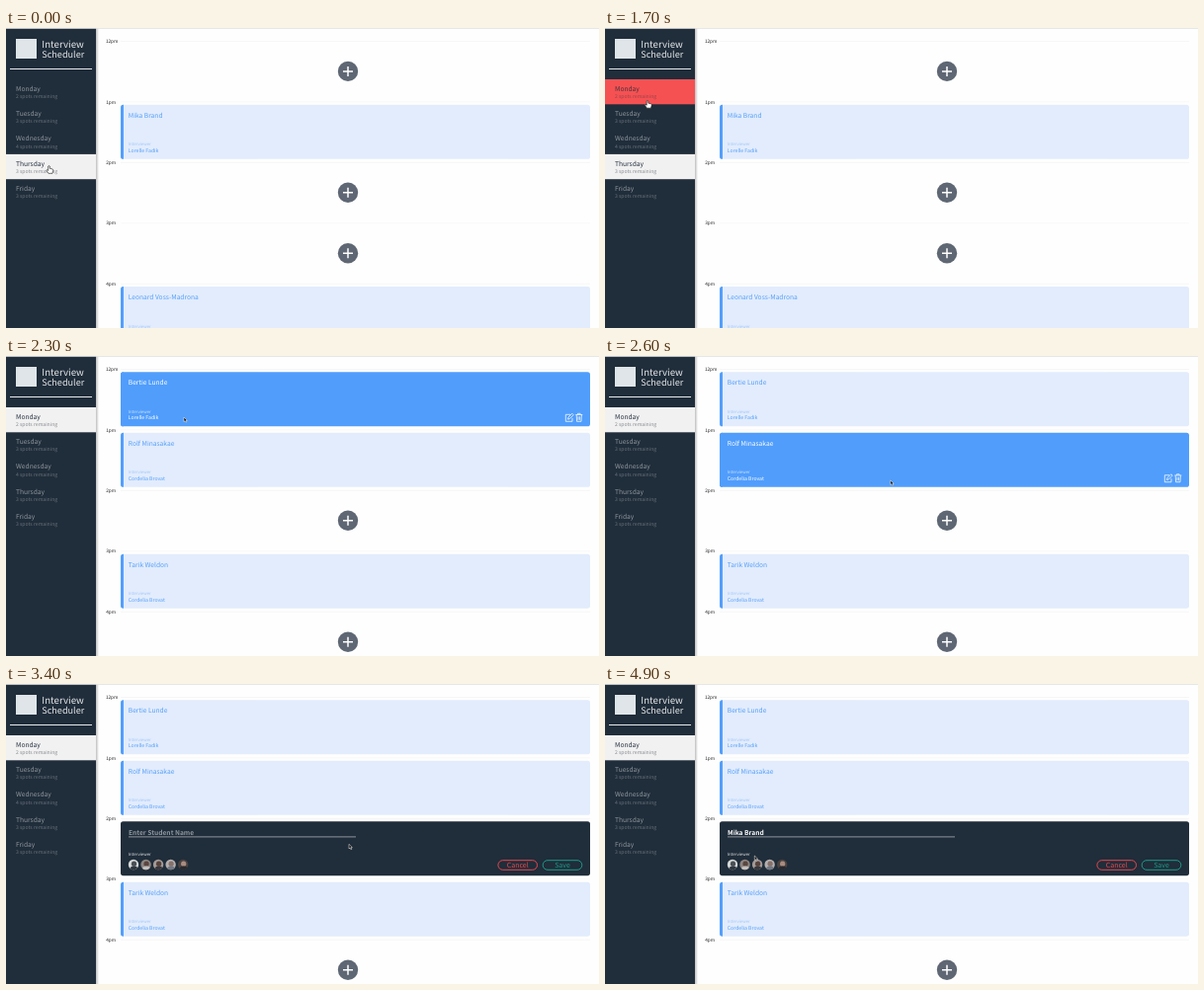
These frames come from a looping animation (600 px wide and 304 px high, 5000 ms). An HTML page:

```html
<!DOCTYPE html>
<html lang="en">
<head>
<meta charset="utf-8">
<title>Interview Scheduler</title>
<style>
html, body { margin: 0; width: 100%; height: 100%; overflow: hidden; background: #fefefe; }
svg { display: block; width: 100vw; height: 100vh; }
text {
  font-family: "Noto Sans CJK JP", "Noto Sans CJK SC", "Noto Sans CJK", "Open Sans", sans-serif;
  font-size: 6.65px; text-rendering: geometricPrecision; white-space: pre;
}
.logo text { font-weight: 300; fill: #e3e6e9; }

.day rect { fill: none; }
.day .title { fill: #8f979f; }
.day .spots { fill: #69737d; font-size: 5.1px; font-weight: 300; }
.day.hover rect { fill: #f55153; }
.day.hover .title { fill: #43333b; }
.day.hover .spots { fill: #9c434a; }
.day.selected rect { fill: #f2f1f1; }
.day.selected .title { fill: #222f3e; }
.day.selected .spots { fill: #858a91; }

.time { font-size: 4.7px; fill: #222; }
.rule { stroke: #f4f4f4; stroke-width: .7; }

.card .bg { fill: #e2ecfc; }
.card .edge { fill: #529ffb; }
.card .name, .card .host { fill: #559ffa; }
.card .label { fill: #a2c6fa; }
.card .icons { display: none; fill: none; stroke: #fff; stroke-width: .75; stroke-linejoin: round; }
.card.hover .bg, .card.hover .edge { fill: #509dfc; }
.card.hover .name, .card.hover .host { fill: #fff; }
.card.hover .label { fill: #cfe3ff; }
.card.hover .icons { display: inline; }
.label { font-size: 4.3px; }
.host { font-size: 5.15px; }

.add circle { fill: #5e6773; }
.add path { stroke: #fff; stroke-width: 1.5; }
.add.hover circle { fill: #222f3e; }

.form .label { fill: #dfe3e7; }
.field { font-weight: 600; fill: #fff; }
.field.empty { fill: #8f979f; }
.button rect { fill: none; stroke: currentColor; stroke-width: 1; }
.button text { fill: currentColor; font-size: 7px; text-anchor: middle; }
</style>
</head>
<body>
<svg viewBox="0 0 600 304" id="stage">
  <defs>
    <linearGradient id="shade">
      <stop offset="0" stop-color="#000" stop-opacity=".25"/>
      <stop offset="1" stop-color="#000" stop-opacity="0"/>
    </linearGradient>
    <clipPath id="round"><circle r="5.2"/></clipPath>
  </defs>
  <rect width="600" height="304" fill="#fefefe"/>
  <g id="main"></g>
  <rect x="91" width="3" height="304" fill="url(#shade)"/>
  <rect width="91" height="304" fill="#202d3a"/>
  <g class="logo">
    <rect x="10" y="11" width="21" height="20" fill="#dfe5e8"/>
    <text x="36.3" y="20.3" style="font-size:9.7px">Interview</text>
    <text x="36.3" y="29.6" style="font-size:9.1px">Scheduler</text>
    <path d="M4 41.5H87" stroke="#e8eaec"/>
  </g>
  <g id="days"></g>
  <rect width="600" height=".8" fill="#e2e2e2"/>
  <g id="pointer">
    <path id="hand" fill="#fff" stroke="#111" stroke-width=".6" stroke-linejoin="round"
      d="M-.8 .5Q0-.4 .8 .5V2.8L3.6 3.5Q4.4 3.8 4.2 5L3.5 7.8H-.6L-2.7 4.8Q-2.5 3.6-.8 4.9Z"/>
    <path id="arrow" fill="#111" stroke="#fff" stroke-width=".5" stroke-linejoin="round"
      d="M0 0V4.6L1.1 3.7L1.9 5.4L2.8 5L2 3.3H3.4Z"/>
    <path id="beam" fill="none" stroke="#ddd" stroke-width=".6" d="M-1-3H1M0-3V3M-1 3H1"/>
  </g>
</svg>
<script>
const LOOP = 5000, TICK = 100;
const ROW = 25.3, ROW_TOP = 52, SLOT = 61.45, SLOT_TOP = 16.3, CARD_H = 55;
const CLICK_DAY = 1800, CLICK_ADD = 3200, FOCUS = 3900, TYPE = 4000, TYPE_END = 4600;
const STUDENT = "Mika Brand";

const days = [["Monday", 2], ["Tuesday", 3], ["Wednesday", 4], ["Thursday", 3], ["Friday", 3]];
const ann = "Lorelle Fadik", bea = "Cordelia Brovat";
const schedules = {
  mon: [["Bertie Lunde", ann], ["Rolf Minasakae", bea], null, ["Tarik Weldon", bea], null],
  thu: [null, [STUDENT, ann], null, null, ["Leonard Voss-Madrona", ann]]
};

// Pointer hotspot: time, x, y
const path = [
  [0, 43.5, 139.5], [400, 43.5, 139.5], [600, 43, 125], [800, 43, 111], [1000, 43, 105],
  [1200, 43, 95], [1500, 43, 73.5], [1800, 43, 73.3], [2000, 60, 70], [2300, 180, 62],
  [2600, 288.8, 126], [2800, 346, 162], [3400, 347, 162.3], [3800, 170, 150],
  [4600, 160, 151], [4900, 151.3, 174], [5000, 151.3, 174]
];

const $ = id => document.getElementById(id);
const slotY = i => SLOT_TOP + i * SLOT;
const rowY = i => ROW_TOP + i * ROW;

const dayRow = ([name, spots], i) => `
  <g class="day" transform="translate(0 ${rowY(i)})">
    <rect width="91" height="${ROW}"/>
    <text class="title" x="10" y="11.8">${name}</text>
    <text class="spots" x="10" y="19">${spots} spots remaining</text>
  </g>`;

const card = ([name, host], i) => `
  <g class="card" data-slot="${i}" transform="translate(116 ${slotY(i)})">
    <rect class="bg" width="475" height="${CARD_H}" rx="2.6"/>
    <path class="edge" d="M3 0H2.6Q0 0 0 2.6V${CARD_H - 2.6}Q0 ${CARD_H} 2.6 ${CARD_H}H3Z"/>
    <text class="name" x="7.8" y="13">${name}</text>
    <text class="label" x="7.8" y="41.6">Interviewer</text>
    <text class="host" x="7.8" y="48.2">${host}</text>
    <g class="icons">
      <path d="M455 43H450.3V50H457V46.5M452.5 47.8L453 45.8L456.8 42L458.2 43.4L454.4 47.2Z"/>
      <path d="M460.3 43.2H467.3M462.5 43V42H465.1V43M461.2 43.4L461.6 50H466L466.4 43.4M463 45V48.5M464.6 45V48.5"/>
    </g>
  </g>`;

const add = i => `
  <g class="add" data-slot="${i}" transform="translate(346 ${slotY(i) + 27.6})">
    <circle r="10.2"/><path d="M-5 0H5M0-5V5"/>
  </g>`;

const face = ([back, hair, coat], i) => `
  <g transform="translate(${129 + 12.55 * i} 183)" clip-path="url(#round)">
    <rect x="-6" y="-6" width="12" height="12" fill="${back}"/>
    <circle cx=".5" cy="-.8" r="2.6" fill="${hair}"/>
    <ellipse cx=".5" cy="5.2" rx="4.2" ry="3.6" fill="${coat}"/>
  </g>`;

const button = (x, label, color) => `
  <g class="button" color="${color}">
    <rect x="${x}" y="178.7" width="39.6" height="9.6" rx="4.8"/>
    <text x="${x + 19.8}" y="186">${label}</text>
  </g>`;

const faces = [
  ["#d5d8d8", "#4a4f55", "#30373f"], ["#8d8581", "#5a4640", "#c3c0be"],
  ["#a39a97", "#57423c", "#39383d"], ["#b4afaf", "#86716c", "#717782"],
  ["#4a4341", "#a98c80", "#282a2f"]
];

const form = `
  <g class="form" id="form">
    <rect x="116" y="${slotY(2)}" width="475" height="${CARD_H}" rx="2.6" fill="#202d3a"/>
    <text class="field" id="field" x="124" y="152.6"></text>
    <path id="caret" stroke="#fff" stroke-width=".5" d="M0 146.5V153.5"/>
    <path d="M124 154.9H354" stroke="#aab0b6" stroke-width=".8"/>
    <text class="label" x="123.8" y="173.6">Interviewer</text>
    ${faces.map(face).join("")}
    ${button(497.9, "Cancel", "#e8484f")}${button(543.2, "Save", "#1c9c88")}
  </g>`;

const hours = ["12pm", "1pm", "2pm", "3pm", "4pm"].map((h, i) => `
  <path class="rule" d="M116 ${slotY(i) - 2.8}H591"/>
  <text class="time" x="${i ? 101.2 : 100.9}" y="${slotY(i) - 1.2}">${h}</text>`).join("");

const slots = (id, list) =>
  `<g id="${id}">${list.map((who, i) => who ? card(who, i) : add(i)).join("")}</g>`;

$("days").innerHTML = days.map(dayRow).join("");
$("main").innerHTML = hours + Object.entries(schedules).map(e => slots(...e)).join("") + form;

const rows = [...document.querySelectorAll(".day")];
const items = [...document.querySelectorAll("[data-slot]")];
const freeSlot = document.querySelector('#mon [data-slot="2"]');
const field = $("field"), caret = $("caret");

const show = (el, on) => { el.style.display = on ? "inline" : "none"; };

function pointerAt(t) {
  const n = path.findIndex(p => p[0] > t);
  const [t0, x0, y0] = path[n - 1], [t1, x1, y1] = path[n];
  const k = (t - t0) / (t1 - t0);
  return [x0 + (x1 - x0) * k, y0 + (y1 - y0) * k];
}

function isOver(el, x, y) {
  const top = slotY(+el.dataset.slot);
  return el.classList.contains("add")
    ? Math.hypot(x - 346, y - top - 27.6) < 10.2
    : x > 116 && x < 591 && y > top && y < top + CARD_H;
}

function draw(t) {
  const [x, y] = pointerAt(t);
  const monday = t >= CLICK_DAY, editing = t >= CLICK_ADD;
  const inMenu = x < 91;

  rows.forEach((row, i) => {
    row.classList.toggle("selected", i === (monday ? 0 : 3));
    row.classList.toggle("hover", inMenu && y >= rowY(i) && y < rowY(i + 1));
  });

  show($("mon"), monday);
  show($("thu"), !monday);
  show($("form"), editing);
  show(freeSlot, !editing);
  items.forEach(el => el.classList.toggle("hover", isOver(el, x, y)));

  const share = Math.min(1, Math.max(0, (t - TYPE) / (TYPE_END - TYPE)));
  const typed = STUDENT.slice(0, Math.ceil(share * STUDENT.length));
  field.textContent = typed || "Enter Student Name";
  field.classList.toggle("empty", !typed);
  show(caret, t >= FOCUS && t <= TYPE_END);
  const width = typed ? field.getComputedTextLength() : 0;
  caret.setAttribute("transform", `translate(${124.2 + width} 0)`);

  const onAdd = !editing && isOver(freeSlot, x, y);
  const onField = editing && x > 124 && x < 354 && y > 145 && y < 155;
  const hand = inMenu || onAdd;
  show($("hand"), hand);
  show($("beam"), onField);
  show($("arrow"), !hand && !onField);
  show($("pointer"), t <= TYPE || t > TYPE_END);
  $("pointer").setAttribute("transform", `translate(${x} ${y})`);
}

const start = performance.now();
function frame() {
  const t = (performance.now() - start) % LOOP;
  draw(Math.floor(t / TICK) * TICK);
  requestAnimationFrame(frame);
}
frame();
</script>
</body>
</html>
```
